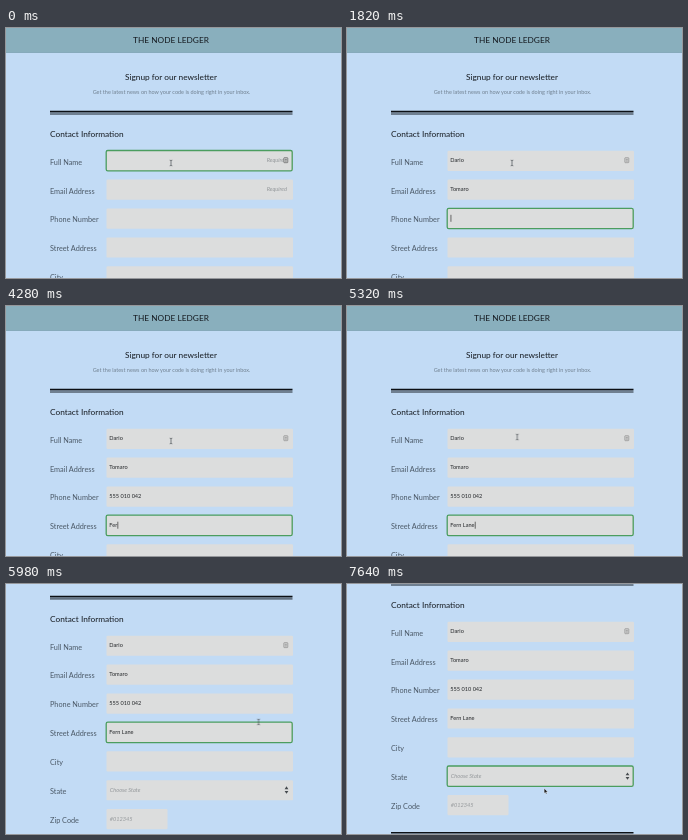
Write an HTML page that moves like this. It is 335 px wide and 250 px high and loops after 7660 ms.

```html
<!DOCTYPE html>
<html lang="en">
<head>
<meta charset="utf-8">
<title>Newsletter signup</title>
<style>
  html, body { margin: 0; width: 100%; height: 100%; overflow: hidden; background: #c2dbf5; }
  svg { display: block; width: 335px; height: 250px; font-family: Lato, "Open Sans", sans-serif; }
  text { white-space: pre; }
  .heading { font-size: 8.3px; fill: #151a20; }
  .center { text-anchor: middle; }
  .sub { font-size: 5.5px; fill: #708090; }
  .label { font-size: 7.3px; fill: #4b5967; }
  .box { fill: #dcdddd; }
  .value { font-size: 5.6px; fill: #24272a; }
  .hint { font-size: 5.6px; font-style: italic; fill: #94989b; }
  .end { text-anchor: end; }
  #ring { fill: none; stroke: #4b9d5f; stroke-width: 1.3; }
  #caret { fill: #333; }

  #page { animation: scroll 7660ms linear infinite; }
  @keyframes scroll {
    0%, 72.5% { transform: translateY(0); }
    75.3% { transform: translateY(-44px); }
    78.07% { transform: translateY(-71px); }
    79.8% { transform: translateY(-81px); }
    81.5%, 100% { transform: translateY(-85px); }
  }
  #pointer { animation: move 7660ms linear infinite; }
  @keyframes move {
    0%, 68% { transform: translate(165px, 135px); }
    69.45% { transform: translate(170px, 131px); }
    74.4% { transform: translate(252px, 138px); }
    81.7%, 85% { transform: translate(253px, 138px); }
    90.7%, 92.2% { transform: translate(204px, 195px); }
    94.6%, 100% { transform: translate(198px, 206px); }
  }
  #beam { animation: hide 7660ms step-end infinite; }
  #arrow { animation: show 7660ms step-end infinite; }
  @keyframes hide { 0% { opacity: 1; } 89% { opacity: 0; } }
  @keyframes show { 0% { opacity: 0; } 89% { opacity: 1; } }
</style>
</head>
<body>
<svg viewBox="0 0 335 250">
  <g id="page">
    <rect width="335" height="24.5" fill="#89afbd"/>
    <rect y="24.2" width="335" height="0.8" fill="#7fa3b4"/>
    <text class="heading center" x="165" y="15">THE NODE LEDGER</text>
    <text class="heading center" x="165" y="52">Signup for our newsletter</text>
    <text class="sub center" x="165.5" y="66">Get the latest news on how your code is doing right in your inbox.</text>
    <path d="M44 83.7H286.5" stroke="#0c1015" stroke-width="1.7"/>
    <path d="M44 86H286.5" stroke="#1d242c"/>
    <text class="heading" x="44" y="109">Contact Information</text>
    <g id="rows"></g>
    <path d="M44 333.7H286.5" stroke="#0c1015" stroke-width="1.5"/>
    <g id="card" stroke="#777" stroke-width="0.6">
      <rect x="277.8" y="129.7" width="4" height="5" rx="0.6" fill="#cfd0d0"/>
      <path d="M278.8 131.4h2M278.8 133h2"/>
    </g>
    <path d="M278.6 276.2l1.9-2.8 1.9 2.8zM278.6 278l1.9 2.8 1.9-2.8z" fill="#454a4e"/>
    <rect id="ring" x="100.2" width="186" height="20.4" rx="1.6"/>
    <rect id="caret" width="0.7" height="7"/>
  </g>
  <g id="pointer">
    <path id="beam" d="M-1.3 -2.8Q0 -2.8 0 -2Q0 -2.8 1.3 -2.8M0 -2V2M-1.3 2.8Q0 2.8 0 2Q0 2.8 1.3 2.8" fill="none" stroke="#4a4f54" stroke-width="0.7"/>
    <path id="arrow" d="M-0.8 -1.6V3.2L0.3 2.2L1.1 3.9L1.9 3.5L1.2 1.9H2.7Z" fill="#111" stroke="#fff" stroke-width="0.35"/>
  </g>
</svg>
<script>
const LOOP = 7660, TOP = 122.7, PITCH = 28.9, LEFT = 103.3;
const $ = id => document.getElementById(id);
const rowY = i => TOP + i * PITCH;

// focus: when the field is entered; from, step: typing rhythm in ms
const fields = [
  { label: "Full Name", text: "Dario", focus: -600, from: 200, step: 110, hint: "Required", right: true },
  { label: "Email Address", text: "Tomaro", focus: 840, from: 960, step: 100, hint: "Required", right: true },
  { label: "Phone Number", text: "555 010 042", focus: 1600, from: 1950, step: 150 },
  { label: "Street Address", text: "Fern Lane", focus: 3860, from: 4020, step: 128 },
  { label: "City" },
  { label: "State", focus: 7020, hint: "Choose State" },
  { label: "Zip Code", hint: "#012345", width: 61 }
];

function add(tag, attrs, text = "") {
  const el = document.createElementNS("http://www.w3.org/2000/svg", tag);
  for (const key in attrs) el.setAttribute(key, attrs[key]);
  el.textContent = text;
  return $("rows").appendChild(el);
}

fields.forEach((f, i) => {
  const y = rowY(i), base = y + 11.5;
  add("text", { class: "label", x: 44, y: y + 13.9 }, f.label);
  add("rect", { class: "box", x: 100.5, y, width: f.width || 186.5, height: 20.2, rx: 1.2 });
  if (f.hint) {
    f.hintEl = add("text", { class: f.right ? "hint end" : "hint", x: f.right ? 281 : LEFT + 0.5, y: base }, f.hint);
  }
  f.valueEl = add("text", { class: "value", x: LEFT, y: base });
});

function render(t) {
  let active = 0;
  fields.forEach((f, i) => {
    if (f.focus <= t) active = i;
    if (!f.text) return;
    f.count = Math.max(0, Math.min(f.text.length, Math.floor((t - f.from) / f.step) + 1));
    const typed = f.text.slice(0, f.count);
    if (f.valueEl.textContent !== typed) f.valueEl.textContent = typed;
    if (f.hintEl) f.hintEl.setAttribute("opacity", f.count ? 0 : 1);
  });

  const f = fields[active], y = rowY(active);
  $("ring").setAttribute("y", y - 0.2);
  $("card").setAttribute("stroke", active ? "#858585" : "#4c4c4c");

  // The blink restarts with every key press.
  const lastKey = f.count ? f.from + (f.count - 1) * f.step : f.focus;
  const lit = f.text && (t - lastKey) % 1000 < 500;
  $("caret").setAttribute("opacity", lit ? 1 : 0);
  if (lit) {
    const width = f.count ? f.valueEl.getComputedTextLength() : 0;
    $("caret").setAttribute("x", LEFT + width + 0.3);
    $("caret").setAttribute("y", y + 6.3);
  }
}

let start;
function tick(now) {
  start ??= now;
  render((now - start) % LOOP);
  requestAnimationFrame(tick);
}
render(0);
requestAnimationFrame(tick);
</script>
</body>
</html>
```
